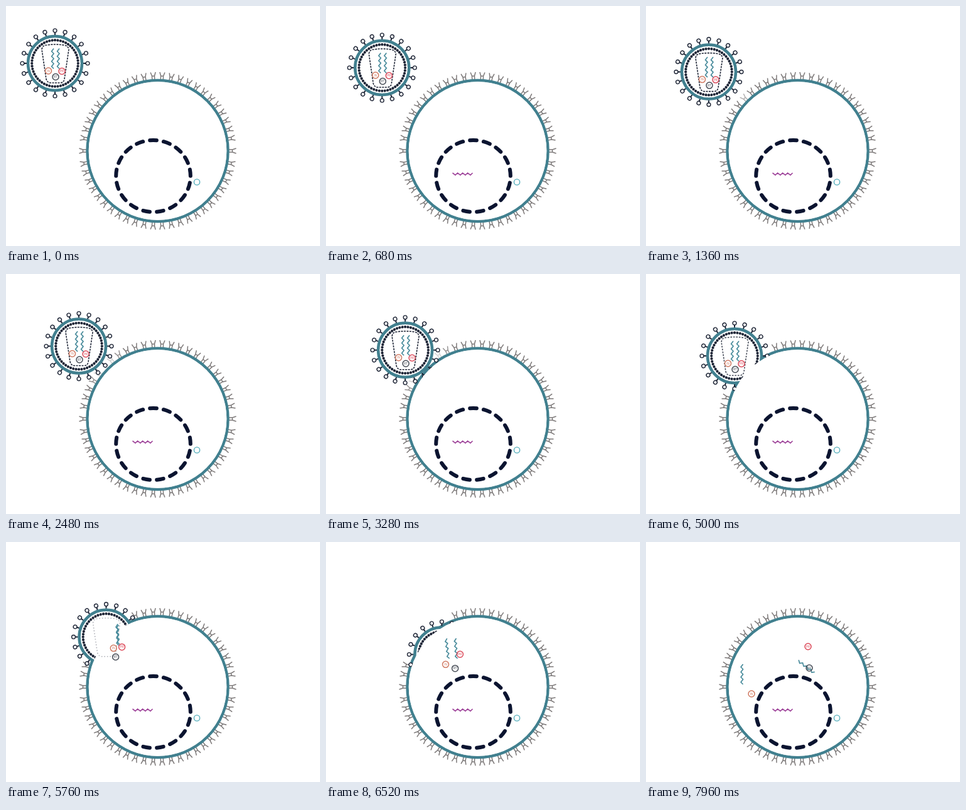
These frames come from a looping animation (500x381 px, 8 s). An HTML page with a canvas:

```html
<!DOCTYPE html>
<html lang="en">
<head>
<meta charset="utf-8">
<title>Virus entering a cell</title>
<style>
  html, body { margin: 0; width: 100%; height: 100%; overflow: hidden; background: #fff; }
  canvas { display: block; }
</style>
</head>
<body>
<canvas id="stage" width="500" height="381"></canvas>
<script>
const ctx = document.getElementById('stage').getContext('2d');
const LOOP = 8000, STEP = 40, FUSION = 5000, TURN = 2 * Math.PI;
const TEAL = '#41808f', NAVY = '#0b1430', INK = '#1e2536', GREY = '#7c7878';
const CELL = { x: 241.5, y: 230, r: 112 };
const START = { x: 78, y: 91 }, CONTACT = { x: 141, y: 130 }, INSIDE = { x: 225, y: 224 };

// Each part rides in the virus at `offset`, then passes `mid` on its way to `end`
const strands = [
  { offset: { x: -3.5, y: -7.5 }, mid: { x: 193, y: 168 }, end: { x: 153, y: 210 }, tilt: u => -7 * Math.sin(Math.PI * u) },
  { offset: { x: 5.5, y: -7.5 }, mid: { x: 205.5, y: 168 }, end: { x: 255, y: 198 }, tilt: u => -53 * u ** 4 }
];
const enzymes = [
  { label: 'IN', color: '#d07a62', offset: { x: -10.5, y: 12 }, mid: { x: 190, y: 193 }, end: { x: 168, y: 241 } },
  { label: 'PR', color: '#dc4a5a', offset: { x: 11, y: 12.5 }, mid: { x: 212, y: 178 }, end: { x: 258, y: 166 } },
  { label: 'RT', color: '#454b55', offset: { x: 1, y: 21.5 }, mid: { x: 204, y: 200 }, end: { x: 260, y: 200 } }
];

const strandShape = new Path2D('M-16 -1.5' + 'l4.5 3.4l3.5 -3.4'.repeat(4));
const receptorShape = new Path2D('M-2 0V-6L-4 -12M2 0V-6L4 -12M-2 -6H2');
const capsidShape = new Path2D('M-21 -22Q-20 -29 -13 -29Q0 -31 14 -29Q21 -28 22 -22L15 25Q14 31 8 31H-7Q-12 31 -14 25Z');

const ramp = (t, from, to) => Math.min(1, Math.max(0, (t - from) / (to - from)));
const mix = (a, b, p) => ({ x: a.x + (b.x - a.x) * p, y: a.y + (b.y - a.y) * p });
const add = (a, b) => ({ x: a.x + b.x, y: a.y + b.y });

function virusAt(t) {
  if (t < FUSION) return mix(START, CONTACT, 1 - (1 - t / FUSION) ** 1.35);
  return mix(CONTACT, INSIDE, ramp(t, FUSION, 7600) ** 1.23);
}

// Parabola from the fusion site through the middle point to the end point
function partAt(t, { offset, mid, end }) {
  const u = ramp(t, FUSION, LOOP - STEP);
  if (u === 0) return add(virusAt(t), offset);
  const from = add(CONTACT, offset);
  const control = mix(mix(from, end, .5), mid, 2);
  return mix(mix(from, control, u), mix(control, end, u), u);
}

function at({ x, y }, angle, draw) {
  ctx.save();
  ctx.translate(x, y);
  ctx.rotate(angle * TURN / 360);
  draw();
  ctx.restore();
}

function circle({ x, y }, r, stroke, width, fill) {
  ctx.beginPath();
  ctx.arc(x, y, r, 0, TURN);
  if (fill) { ctx.fillStyle = fill; ctx.fill(); }
  if (stroke) { ctx.strokeStyle = stroke; ctx.lineWidth = width; ctx.stroke(); }
}

function trace(shape, color, width) {
  ctx.strokeStyle = color;
  ctx.lineWidth = width;
  ctx.stroke(shape);
}

function drawReceptor(direction, opacity = 1) {
  at(CELL, direction + 90, () => {
    ctx.translate(0, -CELL.r - 1);
    ctx.globalAlpha = opacity;
    trace(receptorShape, GREY, 1.5);
  });
}

// Receptors vanish outwards from the contact point and return after entry
function contactOpacity(t, distance) {
  if (distance > 3) return 1;
  const from = 700 + 750 * distance;
  return 1 - ramp(t, from, from + 1600) + ramp(t, 6900, 7500);
}

function drawReceptors(t) {
  drawReceptor(0);
  drawReceptor(180);
  for (let k = 0; k < 12; k++) {
    const a = 9.6 + 7 * k;
    for (const direction of [a, -a, 180 - a]) drawReceptor(direction);
    drawReceptor(180 + a, contactOpacity(t, Math.abs(k - 5)));
  }
}

function drawShell() {
  const center = { x: 0, y: 0 };
  for (let i = 0; i < 20; i++) {
    at(center, i * 18, () => {
      trace(new Path2D('M0 -45V-49'), INK, 2);
      circle({ x: 0, y: -52 }, 2.9, INK, 1.4, '#fff');
    });
  }
  circle(center, 43, TEAL, 4.5, '#fff');
  for (let i = 0; i < 52; i++) {
    at(center, i * 360 / 52, () => circle({ x: 0, y: -36.8 }, 2.1, null, 0, INK));
  }
}

function drawCapsid(t) {
  const decay = ramp(t, 4700, 6300);
  ctx.globalAlpha = 1 - decay;
  ctx.setLineDash([3 - 2 * decay, 1.5 + 2 * decay]);
  trace(capsidShape, INK, 1.6);
}

function drawParts(t) {
  const u = ramp(t, FUSION, LOOP - STEP);
  for (const strand of strands) {
    at(partAt(t, strand), 90 + strand.tilt(u), () => trace(strandShape, '#4a8c9c', 1.7));
  }
  ctx.font = '4.5px Arial, "Liberation Sans", sans-serif';
  ctx.textAlign = 'center';
  ctx.textBaseline = 'middle';
  for (const enzyme of enzymes) {
    const p = partAt(t, enzyme);
    circle(p, 5, enzyme.color, 1.5);
    ctx.fillStyle = enzyme.color;
    ctx.fillText(enzyme.label, p.x, p.y + .3);
  }
}

function drawNucleus(t) {
  const pores = 17, half = .09;
  ctx.save();
  ctx.lineCap = 'round';
  ctx.strokeStyle = NAVY;
  ctx.lineWidth = 6;
  for (let i = 0; i < pores; i++) {
    const mid = (i / pores - .25) * TURN;
    ctx.beginPath();
    ctx.ellipse(234.5, 270, 59.3, 57, 0, mid - half, mid + half);
    ctx.stroke();
  }
  ctx.restore();
  if (t >= STEP) at({ x: 217.5, y: 266.5 }, 0, () => trace(strandShape, '#a0479c', 1.7));
  circle({ x: 304, y: 279.5 }, 4.6, '#52adbb', 1.4);
}

function draw(t) {
  const virus = virusAt(t);
  ctx.fillStyle = '#fff';
  ctx.fillRect(0, 0, 500, 381);
  drawReceptors(t);
  circle(CELL, CELL.r, TEAL, 4.5);
  at(virus, 0, drawShell);
  // The cell interior hides the part of the shell that has fused
  circle(CELL, CELL.r - 2.2, null, 0, '#fff');
  drawNucleus(t);
  at(virus, 0, () => drawCapsid(t));
  drawParts(t);
}

function frame() {
  const t = performance.now() % LOOP;
  draw(Math.floor(t / STEP) * STEP);
  requestAnimationFrame(frame);
}
frame();
</script>
</body>
</html>
```
